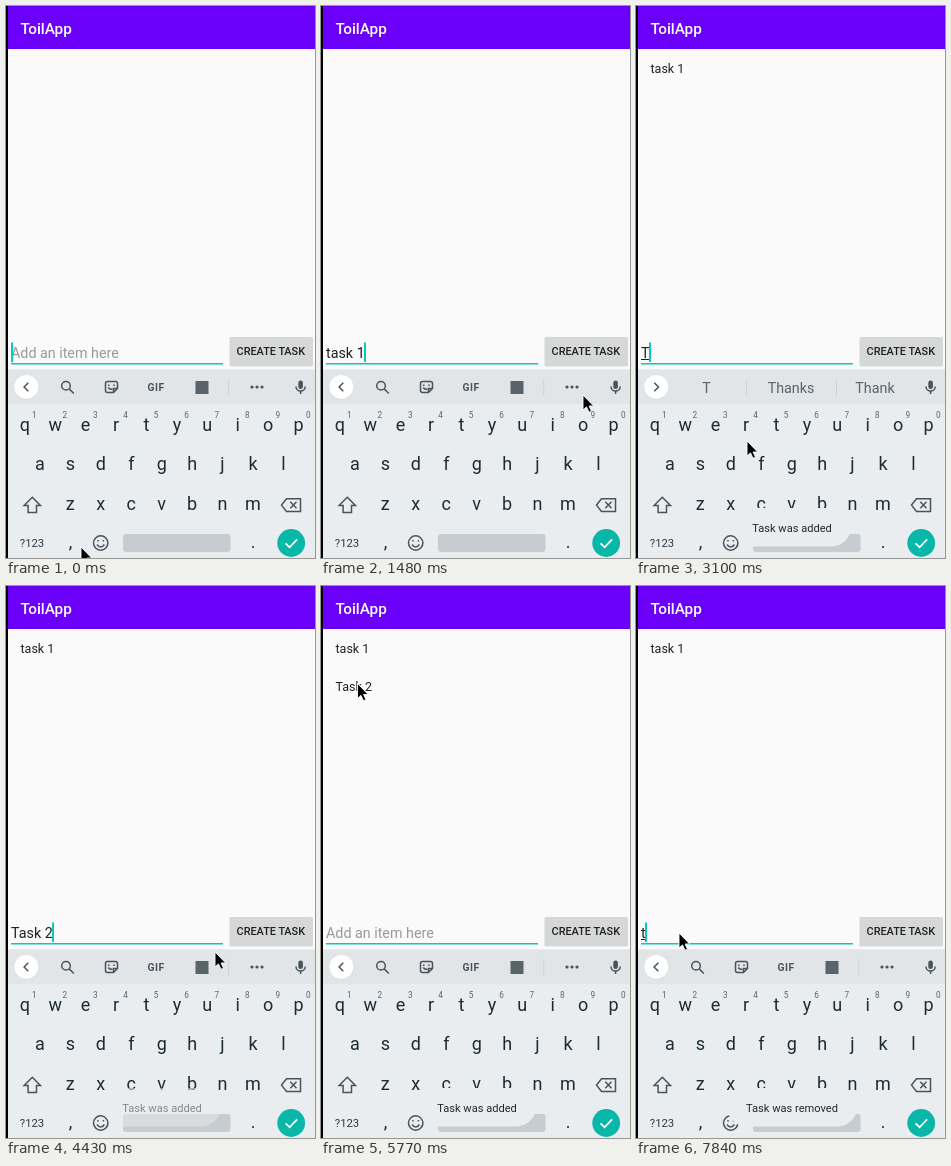
An HTML page for the animation above (7.99 s loop, 309x552 px).

```html
<!DOCTYPE html>
<html lang="en">
<head>
<meta charset="utf-8">
<title>Task list demo</title>
<style>
html, body { margin: 0; width: 100%; height: 100%; overflow: hidden; background: #fafafa; }
svg { display: block; width: 100vw; height: 100vh; font-family: Roboto, sans-serif; }
text { white-space: pre; }
.mid { text-anchor: middle; }
.line { fill: none; stroke: #49545a; stroke-width: 1.5; }
.field { font-size: 14.3px; }
.item { font-size: 12.5px; fill: #202020; }
.key { font-size: 18px; fill: #1d2c33; }
.word { font-size: 14.3px; fill: #59646a; }
</style>
</head>
<body>
<svg id="stage" viewBox="0 0 309 552">
  <rect width="309" height="552" fill="#fafafa"/>
  <rect width="309" height="43" fill="#6a00f9"/>
  <text x="14.5" y="28" font-size="15.3" font-weight="500" fill="#fff">ToilApp</text>
  <text class="item" id="item1" x="14.5" y="67">task 1</text>
  <text class="item" id="item2" x="14.5" y="105">Task 2</text>

  <text class="field" id="hint" x="5" y="352" fill="#999">Add an item here</text>
  <text class="field" id="entry" x="5" y="352" fill="#202020"></text>
  <rect id="composing" x="5" y="353" height="1" fill="#202020"/>
  <rect x="5" y="357" width="212" height="1.5" fill="#08cab9"/>
  <rect id="caret" y="336.5" width="2" height="19.5" fill="#08cab9"/>
  <rect id="button" x="223.5" y="331" width="83.5" height="29.5" rx="1.5"/>
  <text class="mid" x="264.8" y="349.4" font-size="10.9" font-weight="500" fill="#202020">CREATE TASK</text>

  <rect y="363.5" width="309" height="189" fill="#e9edf0"/>
  <rect y="363.5" width="309" height="34.5" fill="#e1e5e8"/>
  <circle cx="20.3" cy="381.6" r="12" fill="#c9cdd0"/>
  <circle cx="20.3" cy="381" r="12" fill="#fff"/>
  <path class="line" id="chevron"/>
  <g id="tools">
    <circle class="line" cx="60" cy="379.7" r="4.3"/>
    <path class="line" d="M63.2 382.9l4.6 4.6"/>
    <path class="line" d="M101.5 375.5h8q2 0 2 2v5l-4 4h-6q-2 0-2-2v-7q0-2 2-2zM111.5 382.5h-4v4M102.3 381.5q1.7 2.6 4 1.3M102.7 378.5v1.5M108 378.5v1.5"/>
    <text class="mid" x="150" y="384.6" font-size="10.3" font-weight="700" letter-spacing=".5" fill="#49545a">GIF</text>
    <rect x="189.5" y="375" width="13" height="13" fill="#59646a"/>
    <path d="M222.7 373v17" stroke="#d0d4d7"/>
    <path d="M246 381h.01M251 381h.01M256 381h.01" stroke="#49545a" stroke-width="3.2" stroke-linecap="round"/>
  </g>
  <g id="words">
    <path d="M110.5 373v17M200.5 373v17" stroke="#cdd1d4"/>
    <text class="word mid" x="70.5" y="387"></text>
    <text class="word mid" x="155" y="387"></text>
    <text class="word mid" x="239" y="387"></text>
  </g>
  <rect x="292.3" y="374.5" width="4.6" height="8.6" rx="2.3" fill="#49545a"/>
  <path class="line" d="M290 380.5a4.6 4.6 0 0 0 9.2 0M294.6 385v3"/>

  <g id="keys"></g>
  <path class="line" d="M26.3 491.2l8.2 8.4h-4v7h-8.4v-7h-4z"/>
  <path class="line" d="M280.5 492.7h14v12.8h-14l-5-6.4zM284.3 495.8l6.2 6.4M290.5 495.8l-6.2 6.4"/>
  <text class="mid" x="26" y="541" font-size="11.3" fill="#2c393f">?123</text>
  <text class="key mid" x="64.5" y="542">,</text>
  <text class="key mid" x="247" y="542">.</text>
  <circle class="line" cx="94.7" cy="537" r="7.2"/>
  <path class="line" d="M91 538.5q3.7 5 7.4 0M92 534v1.6M97.4 534v1.6"/>
  <rect x="117" y="528" width="107.5" height="18" rx="3" fill="#c7ccd0"/>
  <circle cx="285.2" cy="537" r="13.9" fill="#08b7a7"/>
  <path d="M279.6 537.3l4 4 7.5-8" fill="none" stroke="#fff" stroke-width="1.8"/>

  <g id="toast">
    <rect y="502" height="38.5" rx="19.25" fill="#eaedef"/>
    <text class="mid" x="156" y="526" font-size="11.1" fill="#262626"></text>
  </g>
  <path id="pointer" d="M0 0V15L3.5 11.9 6 17.3 8.5 16.2 6.1 11H10.7Z" fill="#000" stroke="#fff" stroke-width=".9"/>
  <rect width="2" height="552" fill="#000"/>
</svg>
<script>
const LOOP = 7990, TICK = 148, LEAD = 20;
const $ = id => document.getElementById(id);
const [toastBox, toastText] = $("toast").children;
const wordCells = $("words").querySelectorAll("text");

// Each track is a list of [tick, value] steps; the value holds until the next one.
const typed = [[0, ""], [1, "t"], [2, "ta"], [3, "task"], [4, "task "], [8, "task 1"], [15, ""],
  [21, "T"], [22, "Tas"], [23, "Task"], [26, "Task "], [28, "Task 2"], [34, ""], [53, "t"]];
const predicted = [[0, ""], [2, "ta take talk"], [3, "task tasks Task"], [4, "is and for"], [8, ""],
  [21, "T Thanks Thank"], [22, "Tas Task Tasks"], [23, "Task Tasks Taste"], [26, "is and for"], [28, ""]];
const caretOn = [[0, 1], [7, 0], [8, 1], [11, 0], [14, 1], [18, 0], [21, 1], [32, 0], [34, 1],
  [38, 0], [41, 1], [44, 0], [47, 1], [50, 0], [53, 1]];
const buttonFill = [[0, "#d6d7d7"], [15, "#bdbdbd"], [17, "#cacaca"], [18, "#d6d7d7"],
  [34, "#bdbdbd"], [36, "#cacaca"], [37, "#d6d7d7"]];
const toastAlpha = [[0, 0], [16, .5], [17, 1], [30, .5], [31, 0], [35, .5], [36, 1],
  [48, .5], [49, 0], [50, .5], [51, 1]];
const toastLabel = [[0, "Task was added"], [49, "Task was removed"]];

const pointerPath = [[0, 75, 541], [6, 75, 541], [10, 262, 389], [13, 246, 351], [15, 243, 352],
  [16, 226.3, 387], [18, 111, 435], [27, 111, 435], [30, 209, 366], [32, 250, 345], [34, 248, 348],
  [35, 240, 350], [39, 36.5, 97.5], [41, 37, 102], [46, 37, 102], [50, 43, 347], [54, 43, 347]];

const held = (track, tick) => track.filter(step => step[0] <= tick).pop()[1];
const show = (node, on) => node.setAttribute("visibility", on ? "visible" : "hidden");

function pointerAt(tick) {
  const i = Math.max(1, pointerPath.findIndex(p => p[0] >= tick));
  const [t0, x0, y0] = pointerPath[i - 1], [t1, x1, y1] = pointerPath[i];
  const k = (tick - t0) / (t1 - t0);
  return [x0 + (x1 - x0) * k, y0 + (y1 - y0) * k];
}

function buildKeys() {
  const rows = [["qwertyuiop", 18.8, 425], ["asdfghjkl", 34, 464], ["zxcvbnm", 64.3, 504]];
  $("keys").innerHTML = rows.map(([letters, left, y], row) => [...letters].map((letter, i) => {
    const x = left + i * 30.42;
    const digit = row ? "" :
      `<text class="mid" x="${x + 9.6}" y="412" font-size="8.2" fill="#59646a">${(i + 1) % 10}</text>`;
    return `<text class="key mid" x="${x}" y="${y}">${letter}</text>` + digit;
  }).join("")).join("");
}

function drawField(tick) {
  const text = held(typed, tick), entry = $("entry");
  entry.textContent = text;
  const width = text ? entry.getComputedTextLength() : 0;
  show($("hint"), !text);
  $("composing").setAttribute("width", text.includes(" ") ? 0 : width);
  $("caret").setAttribute("x", 5 + Math.floor(width));
  show($("caret"), held(caretOn, tick));
  $("button").setAttribute("fill", held(buttonFill, tick));
}

function drawStrip(tick) {
  const words = held(predicted, tick);
  show($("tools"), !words);
  show($("words"), words);
  words.split(" ").forEach((word, i) => wordCells[i].textContent = word);
  $("chevron").setAttribute("d", words ? "M18.3 376.8l4.2 4.2-4.2 4.2" : "M22.3 376.8l-4.2 4.2 4.2 4.2");
}

function drawToast(tick) {
  toastText.textContent = held(toastLabel, tick);
  const width = toastText.getComputedTextLength() + 38;
  toastBox.setAttribute("x", 156 - width / 2);
  toastBox.setAttribute("width", width);
  $("toast").setAttribute("opacity", held(toastAlpha, tick));
}

function draw(time) {
  const tick = Math.min(53, Math.floor((time % LOOP + LEAD) / TICK));
  show($("item1"), tick >= 15);
  show($("item2"), tick >= 34 && tick < 45);
  drawField(tick);
  drawStrip(tick);
  drawToast(tick);
  $("pointer").setAttribute("transform", `translate(${pointerAt(tick)})`);
}

buildKeys();
const start = performance.now();
function loop() {
  draw(performance.now() - start);
  requestAnimationFrame(loop);
}
loop();
</script>
</body>
</html>
```
